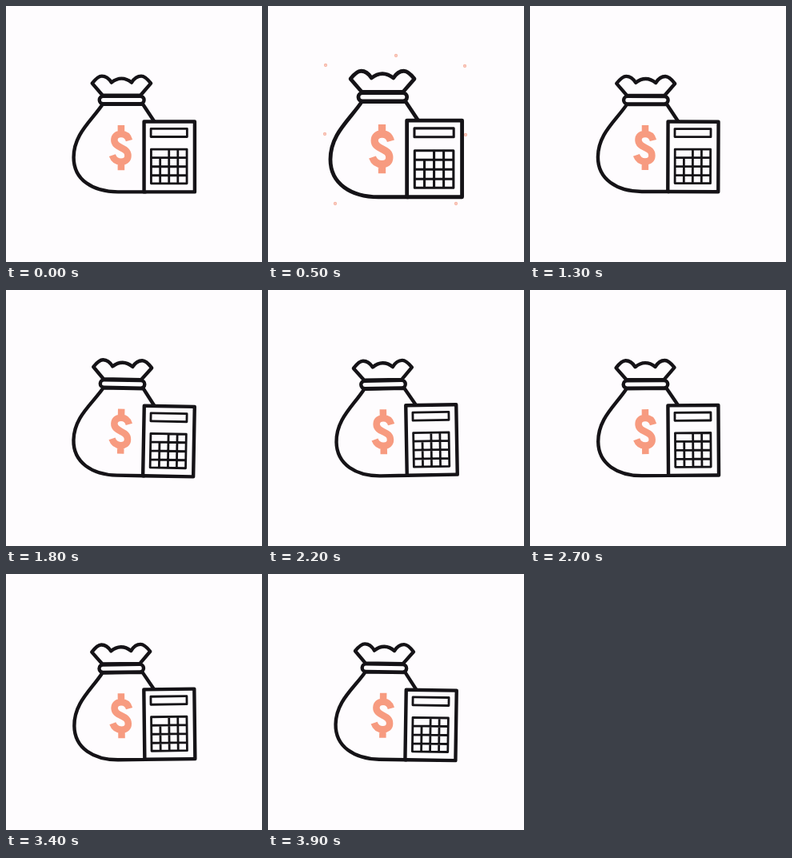
These frames come from a looping animation (320x320 px, 4000 ms). An HTML page:

```html
<!DOCTYPE html>
<html lang="en">
<head>
<meta charset="utf-8">
<title>Money bag and calculator</title>
<style>
  html, body { margin: 0; width: 100%; height: 100%; overflow: hidden; background: #fefcfe; }
  svg { display: block; width: 100vw; height: 100vh; }
  .ink { fill: #fefcfe; stroke: #151317; stroke-width: 4.4; stroke-linejoin: round; stroke-linecap: round; }
  .thin { fill: none; stroke: #151317; stroke-width: 2.8; stroke-linejoin: round; }
  .coral { fill: none; stroke: #f79b80; stroke-width: 8.5; }
</style>
</head>
<body>
<svg viewBox="0 0 320 320">
  <g id="sparks" fill="#fbd5ca" stroke="#f5a08b" stroke-width="1.3"></g>
  <g id="icon">
    <path class="ink" d="M121 123C107 144 85 160 85 189C85 217 109 232 140 232H174L185 144L171 123Z"/>
    <path class="ink" d="M121 112L108 97Q115 88 120 88Q127 88 132 96Q138 91 144.500 91Q151 91 157 96Q162 88 169 88Q174 88 181 97L168 112Z"/>
    <rect class="ink" x="117" y="113" width="55.500" height="9.500" rx="4.700"/>
    <path class="coral" d="M154 168C152.500 162.500 149 160 144 160C138.500 160 135.500 163 135.500 167.500C135.500 173 140 175 144 177C149 179.500 152.500 181.500 152.500 187C152.500 192 149 194.500 144 194.500C138.500 194.500 135 192 133 186.500M144 149V158M144 196V205"/>
    <rect class="ink" x="172.500" y="144.500" width="63" height="87.500"/>
    <rect class="thin" x="181" y="153.500" width="45" height="10"/>
    <path class="thin" d="M181.300 179H225.700V221.500H181.300ZM181.300 189.500H225.700M181.300 200.500H225.700M181.300 211.500H225.700M192.500 189.500V221.500M203.500 179V221.500M214.500 179V221.500"/>
  </g>
</svg>
<script>
  const LOOP = 4000, STEP = 100, PULSE_END = 1200;
  const offsets = [[-88, -86], [0, -98], [86, -85], [-89, 0], [87, 1], [-76, 87], [75, 87]];
  const icon = document.getElementById('icon');
  const group = document.getElementById('sparks');
  const sparks = offsets.map(() =>
    group.appendChild(document.createElementNS('http://www.w3.org/2000/svg', 'circle')));

  // Time, distance, radius and opacity of the sparks
  const burst = [
    [400, 0.78, 1, 0.3],
    [500, 1, 1.5, 0.75],
    [600, 1.17, 2.2, 0.9],
    [800, 1.32, 2.6, 0.7],
    [1200, 1.4, 1.5, 0]
  ];

  function sample(table, t) {
    const i = table.findIndex(row => row[0] >= t);
    if (i < 1) return table[i < 0 ? table.length - 1 : 0];
    const a = table[i - 1], b = table[i];
    const k = (t - a[0]) / (b[0] - a[0]);
    return a.map((v, n) => v + (b[n] - v) * k);
  }

  function draw(t) {
    const pulsing = t < PULSE_END;
    const scale = pulsing ? 1 + 0.095 * Math.sin(Math.PI * (t + 100) / 1300) ** 2 : 1;
    const angle = t > PULSE_END ? 1.1 * Math.cos(2 * Math.PI * (t - 1820) / 670) : 0;
    icon.setAttribute('transform',
      `translate(160 160) rotate(${angle}) scale(${scale}) translate(-160 -160)`);

    const [, reach, radius, alpha] = sample(burst, t);
    group.setAttribute('opacity', t >= 400 && pulsing ? alpha : 0);
    sparks.forEach((dot, i) => {
      dot.setAttribute('cx', 160 + offsets[i][0] * reach);
      dot.setAttribute('cy', 160 + offsets[i][1] * reach);
      dot.setAttribute('r', radius);
    });
  }

  const start = performance.now();
  function tick() {
    const t = (performance.now() - start) % LOOP;
    draw(Math.floor(t / STEP) * STEP);
    requestAnimationFrame(tick);
  }
  draw(0);
  requestAnimationFrame(tick);
</script>
</body>
</html>
```
